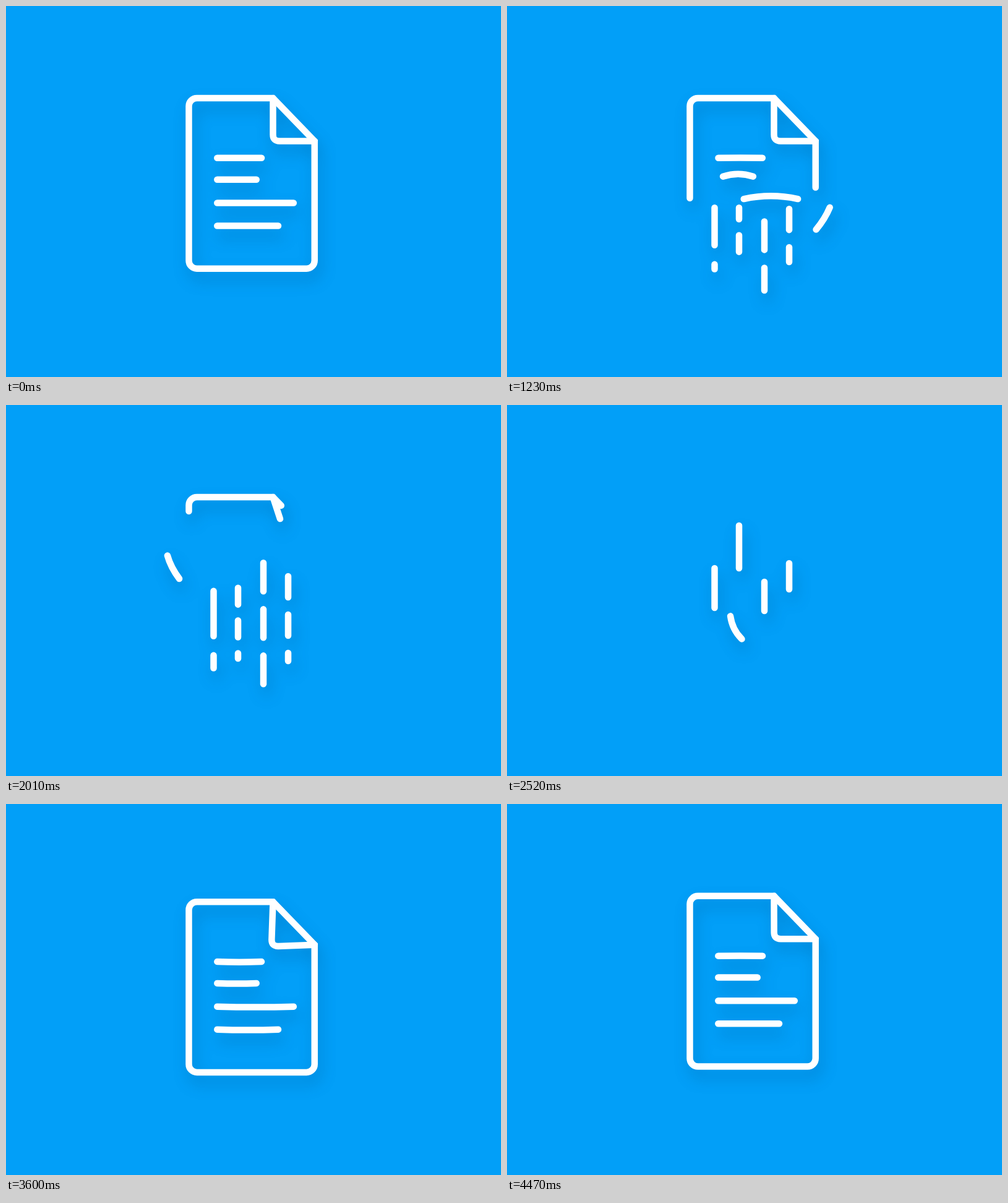
An HTML page that plays this animation: 800 px wide and 600 px high, repeating every 4.5 s.

```html
<!DOCTYPE html>
<html lang="en">
<head>
<meta charset="utf-8">
<title>Document dissolving and dropping in</title>
<style>
  html, body { margin: 0; width: 100%; height: 100%; overflow: hidden; background: #029ff8; }
  svg { display: block; width: 100vw; height: 100vh; }
</style>
</head>
<body>
<svg viewBox="0 0 800 600">
  <filter id="shadow" filterUnits="userSpaceOnUse" x="0" y="0" width="800" height="600" color-interpolation-filters="sRGB">
    <feDropShadow dx="5" dy="14" stdDeviation="12.5" flood-color="#002850" flood-opacity=".22"/>
  </filter>
  <g filter="url(#shadow)">
    <g id="art" fill="none" stroke="#fff" stroke-width="10.5" stroke-linecap="round" stroke-miterlimit="6"></g>
  </g>
</svg>
<script>
const LOOP = 4500, STEP = 30;
const BREAK = 150, BAR = 2270, LAST = 2520, DROP = 2925;
const SPEED = 0.65; // px per ms of everything that rains down
const art = document.getElementById('art');

const clamp = (v, lo, hi) => Math.min(hi, Math.max(lo, v));
const ramp = (t, a, b) => clamp((t - a) / (b - a), 0, 1);
const mix = (a, b, u) => a + (b - a) * u;
const sine = u => (1 - Math.cos(Math.PI * u)) / 2;

function addPath(d = '') {
  const p = document.createElementNS('http://www.w3.org/2000/svg', 'path');
  p.setAttribute('d', d);
  art.append(p);
  return p;
}

const show = (p, on) => p.setAttribute('visibility', on ? 'visible' : 'hidden');

// Shows only the part of a path between two distances
function trim(p, from, to) {
  show(p, to > from);
  p.setAttribute('stroke-dasharray', `${Math.max(0, to - from)} 2000`);
  p.setAttribute('stroke-dashoffset', -from);
}

function untrim(p) {
  show(p, true);
  p.removeAttribute('stroke-dasharray');
}

// Starts at the middle of the bottom edge, where the sheet breaks open
const outline = addPath('M400 424.7H308.5A13 13 0 0 1 295.5 411.7V162A13 13 0 0 1 308.5 149' +
  'H431.5L498.7 218.5V411.7A13 13 0 0 1 485.7 424.7Z');
const outlineLength = outline.getTotalLength();
const fold = addPath();

// Time, length lost on the left, length lost on the right
const erosion = [[BREAK, 0, 0], [660, 59, 51], [840, 125.6, 116.3], [1560, 286.6, 316], [BAR, 389.5, 412.5]];

function eroded(t) {
  const i = Math.max(1, erosion.findIndex(k => t <= k[0]));
  const [a, b] = [erosion[i - 1], erosion[i]];
  const u = ramp(t, a[0], b[0]);
  return [mix(a[1], b[1], u), mix(a[2], b[2], u)];
}

// Each bar lifts and shrinks towards one point between start and end
const bars = [
  { x1: 341.3, x2: 413, y: 245.8, to: 375, start: 1200, end: 1618 },
  { x1: 341.3, x2: 404.7, y: 280.7, to: 375, start: 1000, end: 1480 },
  { x1: 341.3, x2: 464.8, y: 318.5, to: 483, start: 571, end: 1790 },
  { x1: 341.3, x2: 440, y: 355.5, to: 390, start: 546, end: 966 },
  { x1: 316, x2: 415, y: 149, to: 375, start: BAR, end: 2423, top: true }
].map(b => ({ ...b, path: addPath() }));

// Rain: evenly spaced bits per column, then one last bit with its span at LAST
const columns = [
  { x: 335.5, floor: 425.5, first: 371, every: 160, size: 73, last: [264, 328] },
  { x: 375, floor: 410, first: 232, every: 81.4, size: 27, last: [195, 264] },
  { x: 416, floor: 460, first: 197, every: 115.4, size: 46, last: [286, 333] },
  { x: 456, floor: 414, first: 222, every: 95.4, size: 34, last: [256, 298] }
];
const bits = [];
for (const { x, floor, first, every, size, last } of columns) {
  for (let t = first; t < 1600; t += every) {
    bits.push({ x, floor, t, top: -size / 2, bottom: size / 2, path: addPath() });
  }
  bits.push({ x, floor, t: LAST, top: last[0], bottom: last[1], ceiling: 140, path: addPath() });
}

// Loose strokes that travel along a curve
const swoops = [
  { start: 1000, d: 'M498.7 230C545 260 545 340 456 400' },
  { start: 1800, d: 'M295.5 165C240 190 240 270 335.5 330' },
  { start: 2240, d: 'M316 215C352 230 358 300 361 341C363 356 368 367 379 378C395 395 416 405 416 440' }
].map(s => {
  const path = addPath(s.d);
  return { ...s, path, total: path.getTotalLength() };
});

// Steady fall, short braking past the rest position, slow settling
function fallY(t) {
  if (t < 3345) return -94 + 1.05 * (t - 3270);
  if (t < 3400) return mix(13, -15, (1 - ramp(t, 3345, 3400)) ** 2);
  if (t < 3985) return mix(13, -1.6, sine(ramp(t, 3400, 3985)));
  return mix(-1.6, 0, sine(ramp(t, 3985, 4600)));
}

// The rounded corner slides as a whole towards the slanted edge
function drawFold(bend, part) {
  const x = 431.5 + 21.5 * bend, y = 218.5 - 23.3 * bend;
  fold.setAttribute('d', `M431.5 149L${x} ${y - 10.5}Q${x} ${y} ${x + 10.5} ${y}L498.7 218.5`);
  if (part === 1) untrim(fold);
  else trim(fold, 0, part * fold.getTotalLength());
}

function drawBar(b, t, falling, y) {
  const u = falling ? 0 : ramp(t, b.start, b.end) ** 2;
  const x1 = mix(b.x1, b.to, u), x2 = mix(b.x2, b.to, u), level = b.y - 22 * u;
  const bow = falling
    ? Math.min(8.5, 0.095 * (x2 - x1)) * clamp(-y / 90, -0.25, 1)
    : 6 * Math.sin(Math.PI * u);
  show(b.path, b.top ? t >= b.start && t < b.end : falling || t < b.end);
  b.path.setAttribute('d', `M${x1} ${level}Q${(x1 + x2) / 2} ${level - 2 * bow} ${x2} ${level}`);
}

function drawBit(b, t) {
  const ceiling = b.ceiling || 375 - 0.125 * (t - 840); // the sheet's torn edge rises
  const move = SPEED * (t - b.t);
  const top = b.top + move, bottom = b.bottom + move;
  const from = Math.min(b.floor, Math.max(ceiling, top));
  const to = Math.max(from + 0.01, Math.min(b.floor, bottom));
  show(b.path, bottom >= ceiling && top <= b.floor + 3);
  b.path.setAttribute('d', `M${b.x} ${from}V${to}`);
}

function drawSwoop(s, t) {
  const head = SPEED * (t - s.start);
  trim(s.path, Math.max(0, head - 42.3), Math.min(s.total, head));
}

function render(t) {
  const falling = t >= DROP;
  const y = falling ? fallY(t) : 0;
  art.setAttribute('transform', `translate(0 ${y})`);

  if (falling || t <= BREAK) {
    untrim(outline);
  } else if (t < BAR) {
    const [left, right] = eroded(t);
    trim(outline, left, outlineLength - right);
  } else {
    show(outline, false);
  }

  if (falling) drawFold(clamp(-0.04 * y, -0.1, 1), 1);
  else drawFold(ramp(t, 1380, 2330), 1 - ramp(t, 1740, 2150));

  for (const b of bars) drawBar(b, t, falling, y);
  for (const b of bits) drawBit(b, t);
  for (const s of swoops) drawSwoop(s, t);
}

const begin = performance.now();
function tick() {
  const t = (performance.now() - begin) % LOOP;
  render(Math.floor(t / STEP) * STEP);
  requestAnimationFrame(tick);
}
render(0);
requestAnimationFrame(tick);
</script>
</body>
</html>
```
